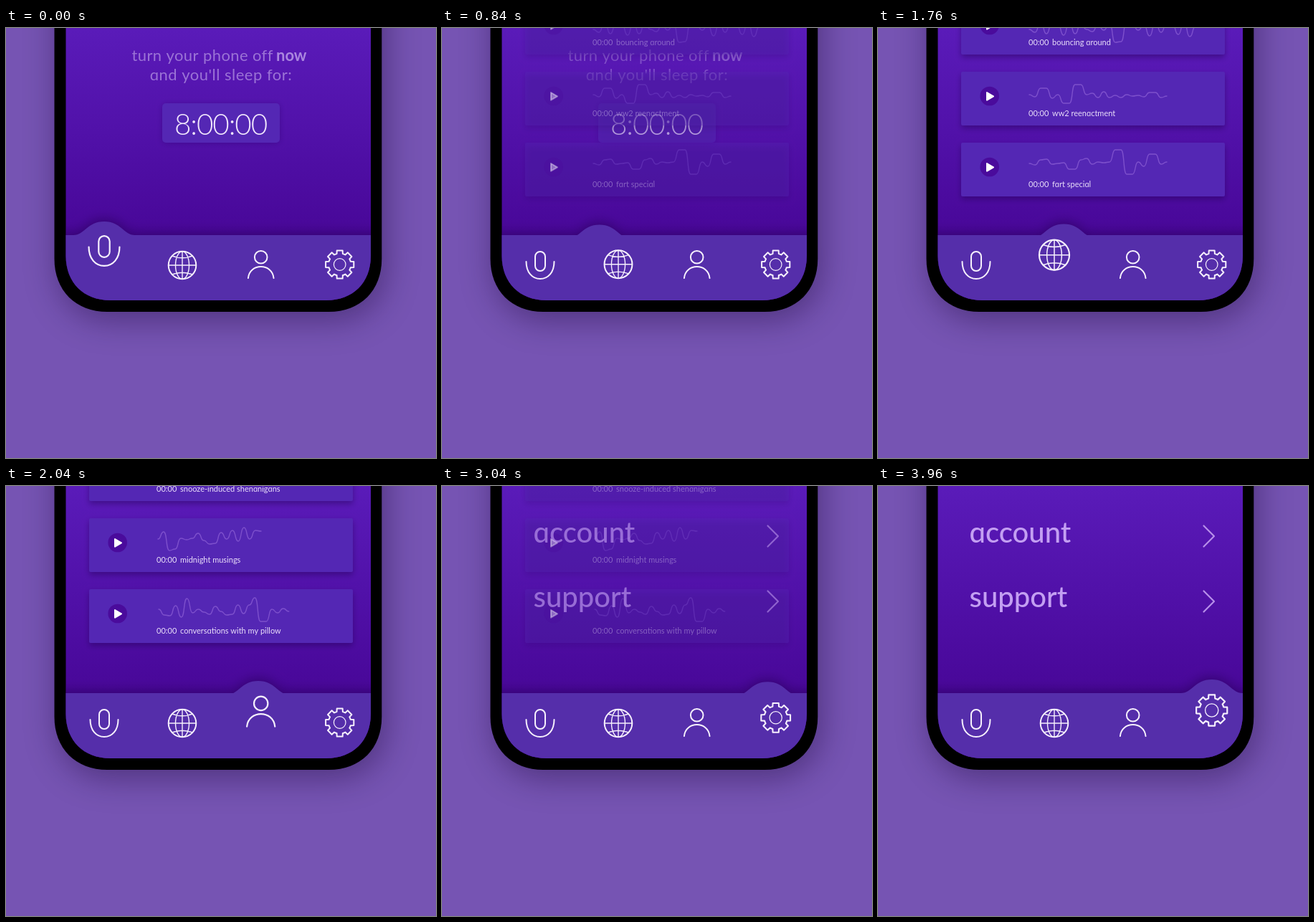
An HTML page with a canvas that plays this animation: 600 by 600 pixels, repeating every 4000 ms.

```html
<!DOCTYPE html>
<html lang="en">
<head>
<meta charset="utf-8">
<title>Sleep recorder</title>
<style>
  html, body { margin: 0; width: 100%; height: 100%; overflow: hidden; background: #7654b3; }
  canvas { display: block; width: 600px; height: 600px; }
</style>
</head>
<body>
<canvas id="stage" width="600" height="600"></canvas>
<script>
const ctx = document.getElementById('stage').getContext('2d');
const LOOP = 4000;
const FACE = 'Lato, "Noto Sans", sans-serif';
const CARD = '#5427b4';
const LINE = '#f6f0fd';

// Each tab switch: start, travel time of the bump, delay and length of the old icon's fall.
const switches = [
  { at: 580, span: 400, fallAt: 0, fall: 250 },
  { at: 1650, span: 450, fallAt: 55, fall: 245 },
  { at: 2740, span: 390, fallAt: 45, fall: 245 }
];

const clamp = v => Math.max(0, Math.min(1, v));
const ease = u => u < 0.5 ? 2 * u * u : 1 - 2 * (1 - u) * (1 - u);
const mix = (a, b, k) => a + (b - a) * k;

function shadow(color, blur, x, y) {
  ctx.shadowColor = color;
  ctx.shadowBlur = blur;
  ctx.shadowOffsetX = x;
  ctx.shadowOffsetY = y;
}

function box(x, y, w, h, r, fill) {
  ctx.beginPath();
  ctx.roundRect(x, y, w, h, r);
  ctx.fillStyle = fill;
  ctx.fill();
}

// The single-storey letter form suits the rounded interface lettering.
function text(str, x, y, size, color, { weight = 400, align = 'left', gap = 0 } = {}) {
  ctx.font = `${weight} ${size}px ${FACE}`;
  ctx.textAlign = align;
  ctx.letterSpacing = gap + 'px';
  ctx.fillStyle = color;
  ctx.fillText(str.replace(/a/g, '\u0251'), x, y);
}

function stroke(width, color, draw) {
  ctx.beginPath();
  draw();
  ctx.lineWidth = width;
  ctx.strokeStyle = color;
  ctx.stroke();
}

// ---------- pages ----------

function wave(x, y, levels, step = 8) {
  stroke(1.4, '#7d50cc', () => {
    ctx.moveTo(x, y + levels[0]);
    for (let i = 1; i < levels.length; i++) {
      const mid = x + step * (i - 0.5);
      ctx.bezierCurveTo(mid + 1, y + levels[i - 1], mid - 1, y + levels[i], x + step * i, y + levels[i]);
    }
  });
}

function card(top, label, x, dy, levels, step) {
  ctx.save();
  shadow('rgba(30,0,80,.45)', 9, 0, 4);
  box(116, top, 368, 75, 2, CARD);
  ctx.restore();
  ctx.beginPath();
  ctx.arc(155.7, top + 34, 13.3, 0, 7);
  ctx.fillStyle = '#4a0b9c';
  ctx.fill();
  ctx.beginPath();
  ctx.moveTo(152, top + 29);
  ctx.lineTo(161, top + 34.3);
  ctx.lineTo(152, top + 39.6);
  ctx.closePath();
  ctx.fillStyle = '#fff';
  ctx.fill();
  stroke(2, '#fff', () => {
    ctx.moveTo(152, top + 29);
    ctx.lineTo(161, top + 34.3);
    ctx.lineTo(152, top + 39.6);
    ctx.closePath();
  });
  wave(x, top + dy, levels, step);
  text('00:00', 210, top + 62, 11, '#eadffa');
  text(label, 243, top + 62, 11, '#eadffa');
}

function timerPage() {
  const tone = '#9b73d6';
  text('turn your phone off', 175.5, 46, 22, tone, { gap: 0.4 });
  text('now', 377, 46, 22, '#aa86df', { weight: 700 });
  text("and you'll sleep for:", 300, 73, 22, tone, { align: 'center', gap: 0.5 });
  ctx.save();
  shadow('rgba(40,0,110,.4)', 8, 0, 1);
  box(218, 105, 164, 55, 5, CARD);
  ctx.restore();
  text('8:00:00', 299.5, 149, 40.5, '#f0e6fc', { weight: 300, align: 'center', gap: -1.1 });
}

function worldPage() {
  card(-38, 'bouncing around', 211, 38,
    [2, 6, -8, 8, -8, -5, 10, -8, 8, -6, 2, 5, -4, 3, -6, 20, 19, -8, -5, 3, -4, 11, -8, 6, -8, -4, 9, -8, 12, -2]);
  card(61, 'ww2 reenactment', 211, 33,
    [-1, 2, -10, -10, 4, -1, 11, 11, -15, -15, -1, -3, 3, -5, 3, 0, 3, -1, 1, 0, 2, -4, -4, 3, 1]);
  card(160, 'fart special', 211, 28,
    [1, 3, -4, -5, 2, 1, 0, 9, 9, -4, -6, 2, -1, 0, -1, -18, -18, 16, 16, -1, 5, -12, -12, 2, -1]);
}

function minePage() {
  card(-54, 'snooze-induced shenanigans', 211, 20, [0, 3, -3, 0]);
  card(45, 'midnight musings', 212, 27,
    [2, -8, 18, 16, 1, 3, 1, -6, 4, 9, 8, -7, 2, -10, 5, -14, 2, -10, -9]);
  card(144, 'conversations with my pillow', 213, 31,
    [-3, 5, 6, -8, 8, -18, 2, -3, 1, 4, -7, 0, 5, 4, -9, 3, -9, -19, 14, 14, -3, 2, -4, 0], 7.9);
}

function settingsPage() {
  [['account', 79, 70], ['support', 169, 161]].forEach(([word, base, mid]) => {
    text(word, 127.5, base, 40, '#c39ff2', { weight: 500 });
    stroke(2.2, '#b78fe9', () => {
      ctx.moveTo(454.5, mid - 14.5);
      ctx.lineTo(469, mid);
      ctx.lineTo(454.5, mid + 14.5);
    });
  });
}

// ---------- tab icons, drawn around their own centre ----------

function mic() {
  stroke(2, LINE, () => {
    ctx.roundRect(-7, -19, 14, 27, 7);
    ctx.moveTo(-19.5, -5);
    ctx.bezierCurveTo(-19.5, 10, -11, 19, 0, 19);
    ctx.bezierCurveTo(11, 19, 19.5, 10, 19.5, -5);
  });
}

function globe() {
  stroke(2, LINE, () => ctx.arc(0, 0, 19.3, 0, 7));
  stroke(1.4, LINE, () => {
    ctx.ellipse(0, 0, 9.5, 19.3, 0, 0, Math.PI * 2);
    ctx.moveTo(0, -19);
    ctx.lineTo(0, 19);
    ctx.moveTo(-19, 0);
    ctx.lineTo(19, 0);
    for (const s of [-1, 1]) {
      ctx.moveTo(-14.5, 13 * s);
      ctx.quadraticCurveTo(0, 7.5 * s, 14.5, 13 * s);
    }
  });
}

function person() {
  stroke(2, LINE, () => ctx.arc(0, -11, 8.8, 0, 7));
  stroke(2, LINE, () => {
    ctx.moveTo(-17.8, 18.3);
    ctx.bezierCurveTo(-15.5, -3, 15.5, -3, 17.8, 18.3);
  });
}

function gear() {
  stroke(2, LINE, () => {
    for (let i = 0; i < 8; i++) {
      const mid = i * Math.PI / 4;
      [[-0.27, 15.6], [-0.2, 20], [0.2, 20], [0.27, 15.6]].forEach(([a, r]) =>
        ctx.lineTo(r * Math.cos(mid + a), r * Math.sin(mid + a)));
      ctx.arc(0, 0, 15.6, mid + 0.27, mid + Math.PI / 4 - 0.27);
    }
    ctx.closePath();
  });
  stroke(1.2, LINE, () => ctx.arc(0, 0, 8.3, 0, 7));
}

const tabs = [
  { x: 137, rest: 331, up: 311, icon: mic, page: timerPage },
  { x: 246, rest: 331, up: 315, icon: globe, page: worldPage },
  { x: 355.7, rest: 330.7, up: 315.5, icon: person, page: minePage },
  { x: 465.7, rest: 330, up: 313, icon: gear, page: settingsPage }
];

// ---------- timeline ----------

function pose(t) {
  const p = { x: tabs[0].x, dip: 0, lift: [1, 0, 0, 0], alpha: [1, 0, 0, 0] };
  switches.forEach((s, i) => {
    const dt = t - s.at;
    if (dt <= 0) return;
    const u = clamp(dt / s.span);
    const fade = clamp((dt - 200) / 160);
    p.x = mix(tabs[i].x, tabs[i + 1].x, ease(u));
    p.dip = 5 * Math.sin(Math.PI * u);
    p.lift[i] = 1 - ease(clamp((dt - s.fallAt) / s.fall));
    p.lift[i + 1] = ease(clamp((dt - 230) / 160));
    p.alpha[i] = 1 - fade;
    p.alpha[i + 1] = fade;
  });
  return p;
}

function nav(p) {
  ctx.save();
  shadow('rgba(40,0,90,.65)', 16, 0, -3);
  ctx.beginPath();
  ctx.rect(60, 289, 480, 120);
  ctx.translate(p.x, 270 + p.dip);
  ctx.moveTo(-43, 19);
  ctx.bezierCurveTo(-27, 19, -24, 0, 0, 0);
  ctx.bezierCurveTo(24, 0, 27, 19, 43, 19);
  ctx.lineTo(43, 40);
  ctx.lineTo(-43, 40);
  ctx.closePath();
  ctx.fillStyle = '#552eaa';
  ctx.fill();
  ctx.restore();
  tabs.forEach((tab, i) => {
    const scale = 1 + 0.1 * p.lift[i];
    ctx.save();
    ctx.translate(tab.x, mix(tab.rest, tab.up, p.lift[i]));
    ctx.scale(scale, scale);
    tab.icon();
    ctx.restore();
  });
}

// Phone outline with softly squared lower corners.
function shell(l, r, b, c) {
  const k = c * 0.4;
  ctx.beginPath();
  ctx.moveTo(l, -80);
  ctx.lineTo(r, -80);
  ctx.lineTo(r, b - c);
  ctx.bezierCurveTo(r, b - k, r - k, b, r - c, b);
  ctx.lineTo(l + c, b);
  ctx.bezierCurveTo(l + k, b, l, b - k, l, b - c);
  ctx.closePath();
}

const sky = ctx.createLinearGradient(0, 0, 0, 289);
sky.addColorStop(0, '#5a1bb9');
sky.addColorStop(0.5, '#5111a9');
sky.addColorStop(1, '#480798');

function draw(t) {
  const p = pose(t);
  ctx.fillStyle = '#7654b3';
  ctx.fillRect(0, 0, 600, 600);

  ctx.save();
  shadow('rgba(25,5,50,.42)', 46, 5, 11);
  shell(67.5, 524.3, 396, 74);
  ctx.fillStyle = '#000';
  ctx.fill();
  ctx.restore();

  ctx.save();
  shell(83.5, 509, 380, 62);
  ctx.fillStyle = sky;
  ctx.fill();
  ctx.clip();
  ctx.lineCap = ctx.lineJoin = 'round';
  tabs.forEach((tab, i) => {
    if (!p.alpha[i]) return;
    ctx.globalAlpha = p.alpha[i];
    tab.page();
  });
  ctx.globalAlpha = 1;
  nav(p);
  ctx.restore();
}

const begin = performance.now();
function tick() {
  draw((performance.now() - begin) % LOOP);
  requestAnimationFrame(tick);
}
tick();
</script>
</body>
</html>
```
